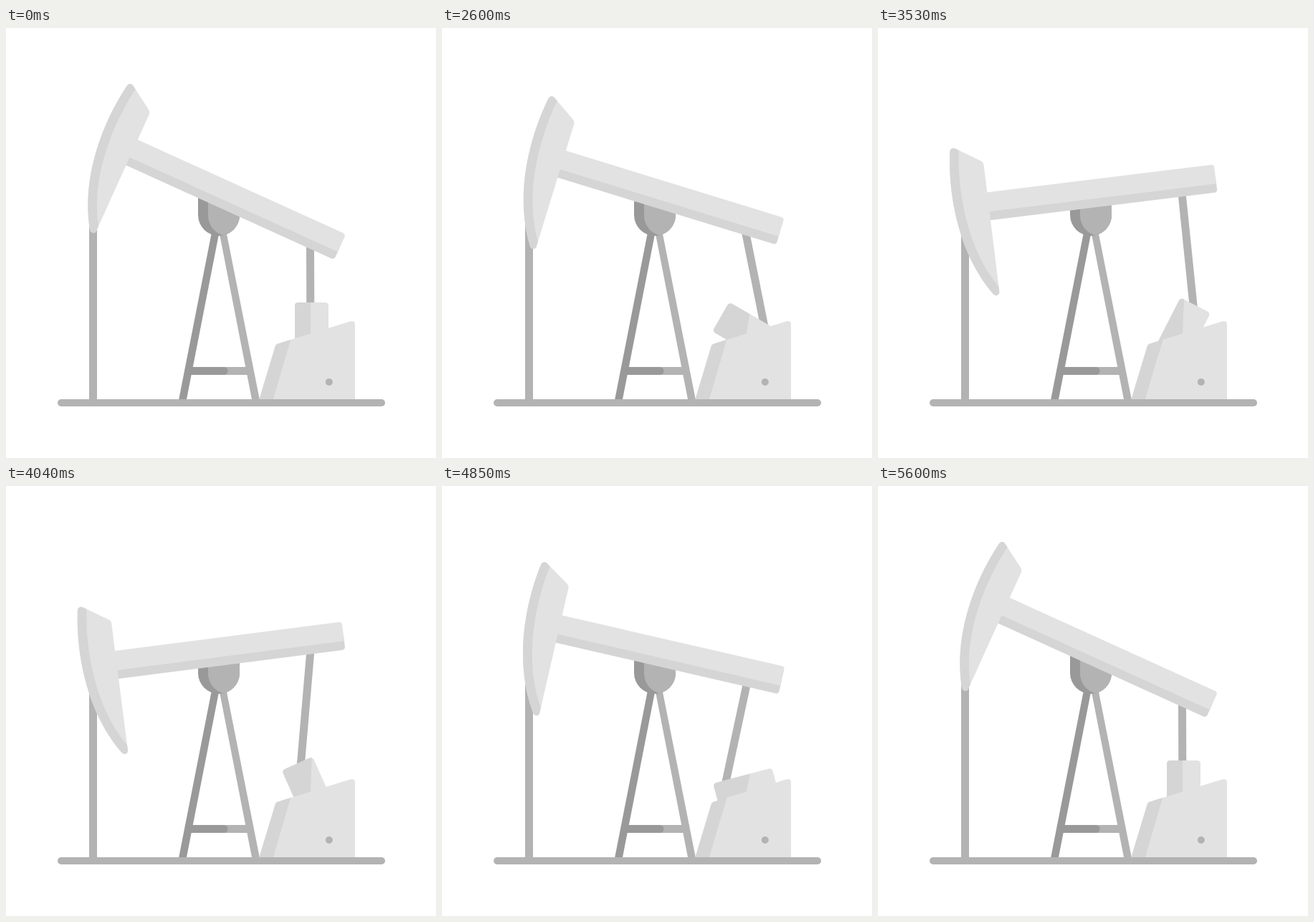
An HTML page that plays this animation: 600 px wide and 600 px high, repeating every 5.63 s.

```html
<!DOCTYPE html>
<html lang="en">
<head>
<meta charset="utf-8">
<title>Pump jack</title>
<style>
  html, body { margin: 0; width: 100%; height: 100%; overflow: hidden; background: #fff; }
  svg { display: block; width: 100vw; height: 100vh; }
  .light { fill: #e2e2e2; }
  .shade { fill: #d5d5d5; }
  .steel { fill: #b3b3b3; }
  .deep { fill: #999; }
</style>
</head>
<body>
<svg viewBox="0 0 600 600">
  <defs>
    <clipPath id="crankShape">
      <rect id="crankClip" x="403" y="383" width="47" height="85" rx="4.5"/>
    </clipPath>
  </defs>

  <!-- well rod, trestle and hub -->
  <rect class="steel" x="116" y="268" width="11" height="252"/>
  <path class="steel" d="M296.5 280H306.5L354 519H343.2Z"/>
  <rect class="steel" x="256" y="473" width="84" height="11"/>
  <path class="deep" d="M256 473H304A5.5 5.5 0 0 1 304 484H254Z"/>
  <path class="deep" d="M288 280H298.5L251.8 519H241Z"/>
  <path class="deep" d="M268 232H326V261A29 29 0 0 1 268 261Z"/>
  <path class="steel" d="M282 232H326V261A29 29 0 0 1 303.5 289.2C290 286 282 274 282 261Z"/>

  <!-- connecting rod and crank -->
  <line id="rod" stroke="#b3b3b3" stroke-width="11"/>
  <rect id="crank" class="light" x="403" y="383" width="47" height="85" rx="4.5"/>
  <g clip-path="url(#crankShape)">
    <rect id="crankShade" class="shade" x="345" y="345" width="80" height="160"/>
  </g>

  <!-- motor housing -->
  <path class="light" d="M373 519L397.3 434.9L480 409.4Q487 407.8 487 414V519Z"/>
  <path class="shade" d="M353 519L375.6 444Q376.3 441.5 378.5 440.8L397.5 434.8L373 519Z"/>
  <circle class="steel" cx="450.8" cy="494" r="5"/>
  <rect class="steel" x="72" y="518" width="457" height="10" rx="5"/>

  <!-- walking beam with horse head -->
  <g id="beam">
    <path class="shade" d="M155 230H474.6V246.3Q474.6 250.8 470 250.8H155Z"/>
    <path class="light" d="M150 211.6H470Q474.6 211.6 474.6 216.2V238.6H150Z"/>
    <path class="light" d="M111 149Q111.8 145.2 115.5 144.6Q117.3 144.5 119 145.6L152 166.8Q155.8 169.2 155.7 173V350Q156 354.5 153 355.6Q149 357 146.5 353C105 290 101.5 208 111 149Z"/>
    <path class="shade" d="M111 149Q111.8 145.2 115.5 144.6Q117.3 144.5 119 145.6L123.7 148.7C114.5 208 119 288 155.7 344V350Q156 354.5 153 355.6Q149 357 146.5 353C105 290 101.5 208 111 149Z"/>
  </g>
</svg>
<script>
  const LOOP = 5630, REST = 2000, STEP = 30, STEP_DEG = 3;
  const PIVOT = { x: 298.5, y: 248.5 };
  const HUB = { x: 425, y: 425.5 };
  const PIN_RADIUS = 34.8, ROD_X = 424.5, BEAM_DROP = 2.3;
  const LOW = 24.4, SWING = 32.9;

  const el = id => document.getElementById(id);
  const [beam, rod, crank, crankClip, crankShade] =
    ['beam', 'rod', 'crank', 'crankClip', 'crankShade'].map(el);
  const rad = deg => deg * Math.PI / 180;
  const ease = u => u < 0.5 ? 2 * u * u : 1 - 2 * (1 - u) * (1 - u);
  const turn = (node, deg, p) => node.setAttribute('transform', `rotate(${deg} ${p.x} ${p.y})`);

  function draw(ms) {
    const steps = Math.max(0, Math.floor((ms % LOOP - REST) / STEP + 1e-6));
    const phase = steps * STEP_DEG % 360;
    const tilt = LOW - SWING * ease(Math.min(phase, 360 - phase) / 180);
    const sin = Math.sin(rad(phase)), cos = Math.cos(rad(phase));

    turn(beam, tilt, PIVOT);
    turn(crank, -phase, HUB);
    turn(crankClip, -phase, HUB);
    turn(crankShade, 12.5 * sin * sin, HUB);

    // The rod joins the crank pin to the underside of the beam.
    const pin = { x: HUB.x + PIN_RADIUS * sin, y: HUB.y + PIN_RADIUS * cos };
    const a = rad(tilt);
    const top = PIVOT.y + (ROD_X - PIVOT.x) * Math.tan(a) + BEAM_DROP / Math.cos(a);
    const lean = (pin.x - ROD_X) / (pin.y - top);
    const hidden = 12;
    rod.setAttribute('x1', ROD_X - lean * hidden);
    rod.setAttribute('y1', top - hidden);
    rod.setAttribute('x2', pin.x);
    rod.setAttribute('y2', pin.y);
  }

  const start = performance.now();
  function tick() {
    draw(performance.now() - start);
    requestAnimationFrame(tick);
  }
  draw(0);
  requestAnimationFrame(tick);
</script>
</body>
</html>
```
